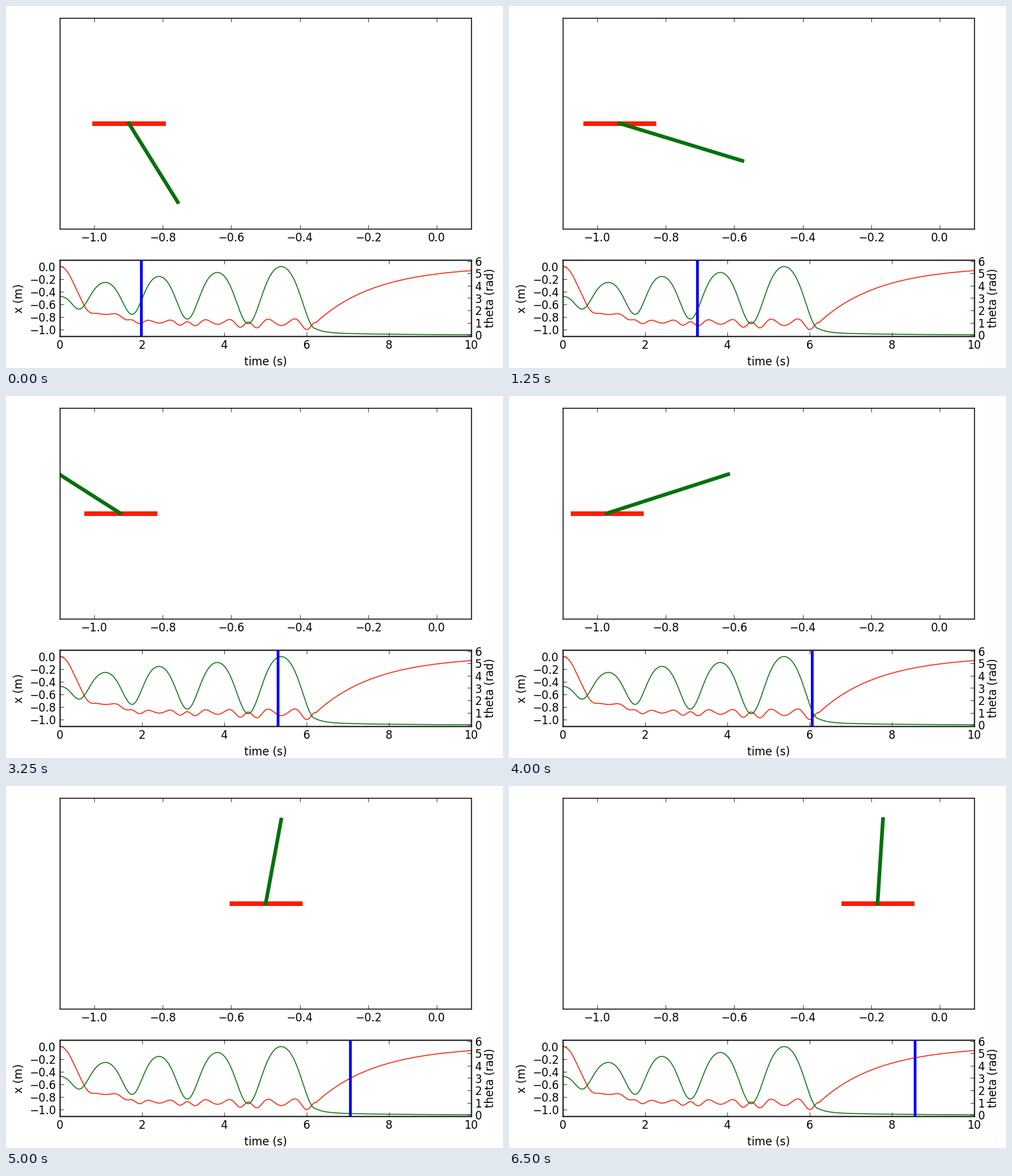
Animation of 749 by 546 pixels, one loop 6.75 s. Source, as a matplotlib script:

```python
import numpy as np
import matplotlib.pyplot as plt
from matplotlib.animation import FuncAnimation

W, H = 749, 546
RED, GREEN, BLUE = "#ff1c00", "#00720a", "#0000fa"
FRAMES, INTERVAL = 27, 250
ROD, HALF_CART = 0.4, 0.1

# Turning points of the swing, alternately high and low.
TURN_TIMES = np.array([0, .47, 1.11, 1.76, 2.41, 3.1, 3.83, 4.58, 5.38, 6.22])
TURN_ANGLES = np.array([np.pi, 2.1, 4.27, 1.67, 4.76, 1.29, 5.08, .92, 5.56, .51])
CATCH = TURN_TIMES[-1]  # from here on everything settles exponentially

plt.rcParams.update({
    "font.family": "DejaVu Sans", "font.size": 12,
    "axes.linewidth": 1.0,
    "xtick.direction": "in", "ytick.direction": "in",
    "xtick.major.size": 4, "ytick.major.size": 4,
    "xtick.major.width": 0.5, "ytick.major.width": 0.5,
    "xtick.major.pad": 3.5, "ytick.major.pad": 4,
})


def ease(s):
    return (1 - np.cos(np.pi * np.clip(s, 0, 1))) / 2


def swing(t):
    """Index of the current swing and its phase: 0 at a low turn, pi at a high one."""
    k = np.clip(np.searchsorted(TURN_TIMES, t) - 1, 0, len(TURN_TIMES) - 2)
    s = (t - TURN_TIMES[k]) / (TURN_TIMES[k + 1] - TURN_TIMES[k])
    u = np.where(k % 2, s, 1 - s)
    return k, np.pi * (u + .08 * np.sin(np.pi * u))  # linger at the top


def angle_at(t):
    k, phase = swing(np.minimum(t, CATCH))
    low = np.minimum(TURN_ANGLES[k], TURN_ANGLES[k + 1])
    high = np.maximum(TURN_ANGLES[k], TURN_ANGLES[k + 1])
    s = np.maximum(t, CATCH) - CATCH
    settled = .194 * np.exp(-.68 * s) + .316 * np.exp(-5 * s)
    return np.where(t < CATCH, low + (high - low) * ease(phase / np.pi), settled)


def cart_at(t):
    """The cart drifts left while pumping the rod, then returns to zero."""
    _, phase = swing(np.minimum(t, CATCH))
    drift = -.745 * ease(t / .83) - .118 * ease((t - 1.2) / .8) - .008 * t
    pump = t * (.011 * np.cos(3 * phase) - .006 * np.cos(phase))
    settled = -.891 * np.exp(-.68 * (np.maximum(t, CATCH) - CATCH))
    return np.where(t < CATCH, drift + pump, settled)


def add_axes(left, top, right, bottom):
    return fig.add_axes([left / W, 1 - bottom / H,
                         (right - left) / W, (bottom - top) / H])


def label(x, y, text, rotation=0):
    fig.text(x / W, 1 - y / H, text, rotation=rotation,
             ha="center", va="center")


fig = plt.figure(figsize=(W / 100, H / 100), dpi=100, facecolor="white")

stage = add_axes(81, 18, 701, 336)
stage.set(xlim=(-1.1, .1), ylim=(-.5, .5), yticks=[],
          xticks=np.arange(-5, 1) / 5)
stage.tick_params(top=True)

plot = add_axes(81, 383, 701, 498)
plot.set(xlim=(0, 10), ylim=(-1.1, .1), xticks=range(0, 11, 2),
         yticks=np.arange(-5, 1) / 5)
plot.tick_params(top=True)
twin = plot.twinx()
twin.set(ylim=(-.1, 6.1), yticks=range(7))

label(391, 537.5, "time (s)")
label(20, 440.5, "x (m)", 90)
label(730, 440.5, "theta (rad)", 90)

times = np.linspace(0, 10, 1001)
plot.plot(times, cart_at(times), color=RED, lw=1)
twin.plot(times, angle_at(times), color=GREEN, lw=1)
cursor = twin.axvline(0, color=BLUE, lw=3, zorder=5)

thick = dict(solid_capstyle="projecting")
cart, = stage.plot([], [], color=RED, lw=5, **thick)
rod, = stage.plot([], [], color=GREEN, lw=4, **thick)


def update(frame):
    t = 1.98 + .26 * frame - .00027 * frame ** 2
    x, angle = float(cart_at(t)), float(angle_at(t))
    cart.set_data([x - HALF_CART, x + HALF_CART], [0, 0])
    rod.set_data([x, x + ROD * np.sin(angle)], [0, ROD * np.cos(angle)])
    cursor.set_xdata([t, t])
    return cart, rod, cursor


anim = FuncAnimation(fig, update, frames=FRAMES, interval=INTERVAL,
                     repeat=True, repeat_delay=0)
plt.show()
```
